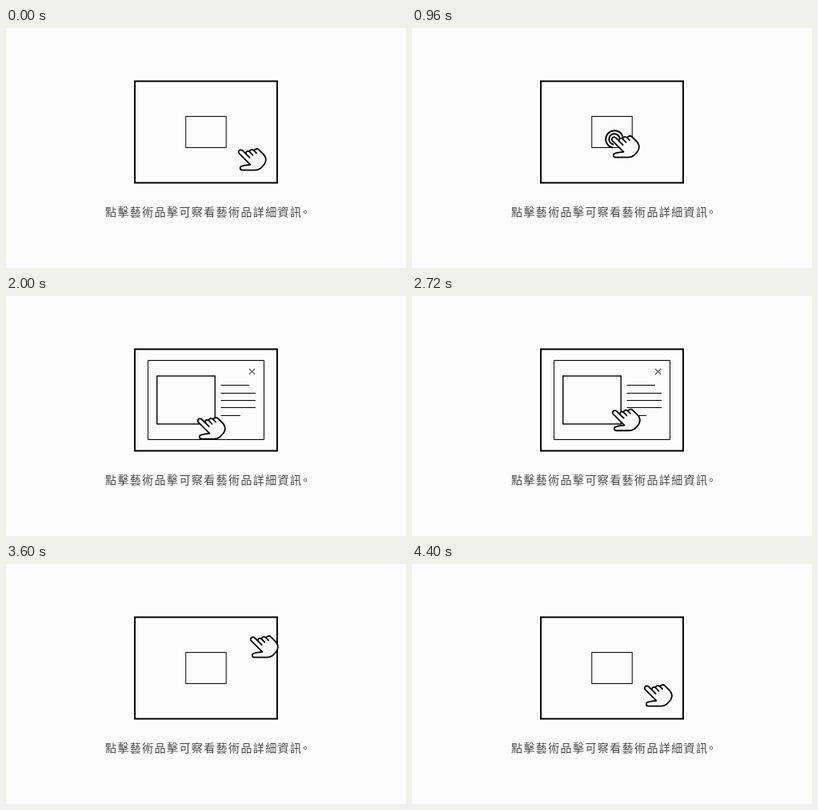
An HTML page with a canvas for the animation above (4.8 s loop, 500 px wide and 300 px high).

```html
<!DOCTYPE html>
<html lang="zh-Hant">
<head>
<meta charset="utf-8">
<style>
  html, body { margin: 0; width: 100%; height: 100%; overflow: hidden; background: #fcfcfc; }
  canvas { display: block; }
</style>
</head>
<body>
<canvas id="stage" width="500" height="300"></canvas>
<script>
const ctx = document.getElementById('stage').getContext('2d');
const LOOP = 4800, STEP = 80;
const BG = '#fcfcfc', INK = '#000';
const CAPTION = '點擊藝術品擊可察看藝術品詳細資訊';
const FONT = '14px "Noto Sans CJK TC", "Noto Sans CJK", sans-serif';

const ramp = (t, a, b) => Math.min(1, Math.max(0, (t - a) / (b - a)));
const mix = (a, b, p) => a + (b - a) * p;

const hand = new Path2D(
  'M291.2 156.6C290.3 155 291 153.2 292.3 152.7C293.8 152.2 295.2 152.7 296 153.5' +
  'L300 157.4C299.4 154.6 301.8 153 304.3 154.5C305 151.8 308 151.3 310 153.2' +
  'C311.3 150.6 314.3 150.4 316 152.2L321.5 157.5C324.5 160.5 325.5 164 324.3 167.5' +
  'C323.3 171 320 173.5 318 175.5C316 177.3 314 177.6 311 177.6L295.5 177.6' +
  'C292 177.6 292 173.3 295 172.6L299 171.6L305.5 170.9Z');
const creases = new Path2D('M300 157.4L304.6 162M304.3 154.5L308.4 158.8M310 153.2L313 156.3');

// Hand offsets: time, x, y
const route = [
  [400, 0, 0], [880, -41, -16], [1280, -41, -16], [1520, -51, 1],
  [2640, -51, 1], [3120, 15, -61], [3680, 15, -61], [4400, 0, 0]
];

function handAt(t) {
  if (t <= route[0][0]) return [0, 0];
  for (let i = 1; i < route.length; i++) {
    const [t0, x0, y0] = route[i - 1], [t1, x1, y1] = route[i];
    if (t <= t1) {
      const p = ramp(t, t0, t1);
      return [mix(x0, x1, p), mix(y0, y1, p)];
    }
  }
  return [0, 0];
}

function line(points, width = 1) {
  ctx.lineWidth = width;
  ctx.beginPath();
  points.forEach(([x, y]) => ctx.lineTo(x, y));
  ctx.stroke();
}

function drawArt(p) {
  const w = mix(50.5, 72.5, p), h = mix(39, 60, p);
  ctx.lineWidth = mix(1, 1.4, p);
  ctx.strokeRect(mix(250, 225, p) - w / 2, 130 - h / 2, w, h);
}

// The outline grows clockwise from the top right corner.
function drawPanel(p) {
  if (p <= 0) return;
  ctx.save();
  ctx.lineWidth = 1;
  ctx.setLineDash([490 * p, 500]);
  if (p >= 1) ctx.setLineDash([]);
  ctx.beginPath();
  ctx.moveTo(322.5, 80.5);
  ctx.lineTo(322.5, 179.5);
  ctx.lineTo(177.5, 179.5);
  ctx.lineTo(177.5, 80.5);
  ctx.closePath();
  ctx.stroke();
  ctx.restore();
}

function drawLines(p) {
  if (p <= 0) return;
  [[111.5, 35.5], [121.5, 43.5], [130.5, 43.5], [139.5, 43.5], [149.5, 24.5]]
    .forEach(([y, w]) => line([[268.5, y], [268.5 + w * p, y]]));
}

function drawCross(alpha) {
  ctx.save();
  ctx.globalAlpha *= alpha;
  line([[304, 91], [311, 98]]);
  line([[311, 91], [304, 98]]);
  ctx.restore();
}

function drawRings(x, y, alpha) {
  ctx.save();
  ctx.globalAlpha = alpha;
  ctx.lineWidth = 1.9;
  for (const r of [6.7, 10.8]) {
    ctx.beginPath();
    ctx.arc(x, y, r, 1.8, 6.15);
    ctx.stroke();
  }
  ctx.restore();
}

function drawHand(x, y) {
  ctx.save();
  ctx.translate(x, y);
  ctx.lineWidth = 1.8;
  ctx.fillStyle = BG;
  ctx.fill(hand);
  ctx.stroke(hand);
  ctx.stroke(creases);
  ctx.restore();
}

function drawCaption() {
  ctx.fillStyle = '#4a4a4a';
  [...CAPTION].forEach((c, i) => {
    ctx.font = (c === '擊' ? '500 ' : '300 ') + FONT;
    ctx.fillText(c, 124 + i * 15.4, 235);
  });
  ctx.font = '300 ' + FONT;
  ctx.fillText('。', 367, 235);
}

function draw(t) {
  ctx.fillStyle = BG;
  ctx.fillRect(0, 0, 500, 300);
  ctx.strokeStyle = INK;
  ctx.lineCap = ctx.lineJoin = 'round';

  ctx.lineWidth = 2;
  ctx.lineJoin = 'miter';
  ctx.strokeRect(161, 66.5, 178, 127);

  const close = ramp(t, 3200, 3600);
  drawArt(ramp(t, 960, 1280) - close);
  ctx.lineCap = 'butt';
  ctx.globalAlpha = 1 - close;
  drawPanel(ramp(t, 960, 1920));
  drawLines(ramp(t, 1200, 1520));
  drawCross(ramp(t, 1760, 2000));
  ctx.globalAlpha = 1;

  ctx.lineCap = ctx.lineJoin = 'round';
  const pulse = at => ramp(t, at - 160, at) - ramp(t, at, at + 160);
  drawRings(253, 139, pulse(960));
  drawRings(309.5, 94.5, pulse(3200));
  drawHand(...handAt(t));
  drawCaption();
}

const start = performance.now();
function tick() {
  const t = (performance.now() - start) % LOOP;
  draw(Math.floor(t / STEP) * STEP);
  requestAnimationFrame(tick);
}
tick();
</script>
</body>
</html>
```
